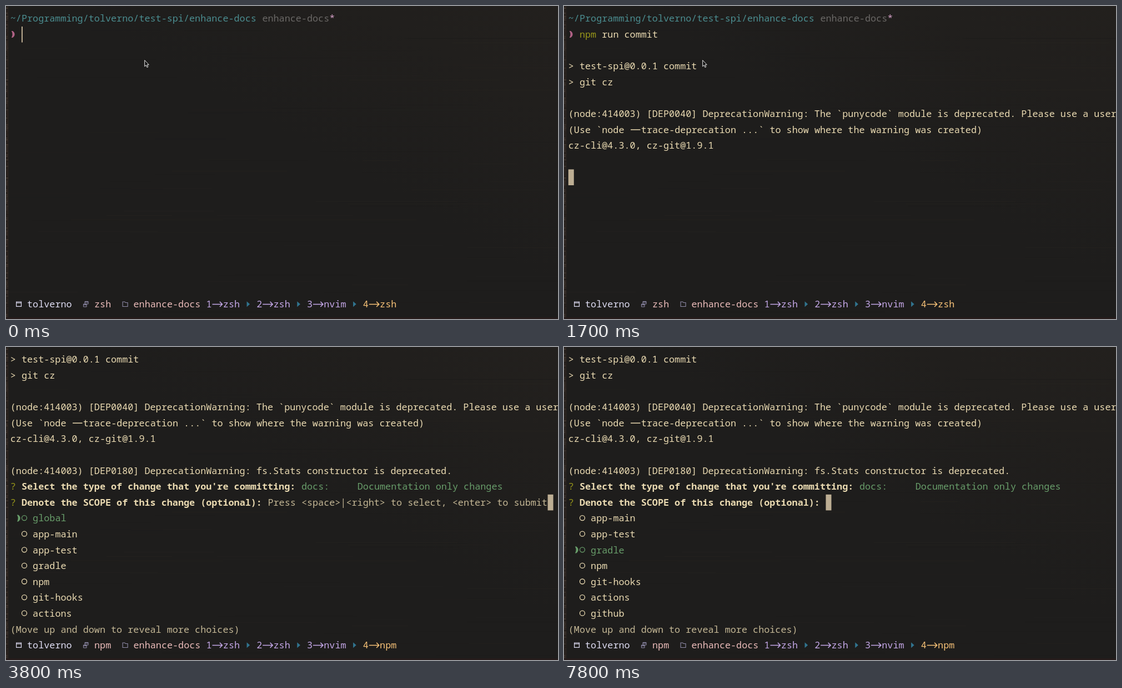
An HTML page that plays this animation: 994 px wide and 564 px high, repeating every 8 s.

```html
<!DOCTYPE html>
<html lang="en">
<head>
<meta charset="utf-8">
<title>Terminal commit prompt</title>
<style>
  html, body { margin: 0; width: 100%; height: 100%; overflow: hidden; background: #1e1d1c; }
  svg { display: block; width: 994px; height: 564px; }
  text { font: 16.8px "Noto Sans Mono", "DejaVu Sans Mono", monospace; white-space: pre; font-variant-ligatures: none; }
  .bold { font-weight: 700; }
</style>
</head>
<body>
<svg viewBox="0 0 994 564">
  <defs>
    <linearGradient id="glow" x1="0" y1="1" x2="1" y2="0">
      <stop offset=".55" stop-color="#2a2520" stop-opacity="0"/>
      <stop offset="1" stop-color="#2a2520" stop-opacity=".4"/>
    </linearGradient>
  </defs>
  <rect width="994" height="564" fill="#1e1d1c"/>
  <rect width="994" height="564" fill="url(#glow)"/>
  <g id="wood"></g>
  <g id="screen"></g>
  <path id="mouse" d="M249.7 97.7v11.2l2.5-2.3 1.8 4 1.8-.8-1.8-3.9h3.3z" fill="#111" stroke="#eee" stroke-width="1"/>
</svg>
<script>
const LOOP = 8000, CELL = 10.08, LINE = 28.6, LEFT = 7.8, TOP = 8.4;
const C = {
  fg: '#ebdbb2', dim: '#c4b795', ghost: '#8f8071', path: '#4b8d90', branch: '#6a6866', star: '#d9a3cb',
  prompt: '#b16286', olive: '#98971a', red: '#cc241d', green: '#689d6a', cursor: '#bdae93',
  session: '#e0def4', rose: '#ebbcba', icon: '#908caa', iris: '#c4a7e7', pine: '#31748f', gold: '#f6c177'
};
const colX = c => +(LEFT + c * CELL).toFixed(2);
const rowY = r => +(TOP + r * LINE).toFixed(2);
const escape = s => s.replace(/&/g, '&amp;').replace(/</g, '&lt;');

const put = (r, c, s, fill = C.fg, cls = '') =>
  `<text x="${colX(c)}" y="${rowY(r) + 20}" fill="${fill}" class="${cls}">${escape(s)}</text>`;
const shape = (r, c, d, style) =>
  `<path transform="translate(${colX(c)} ${rowY(r)})" d="${d}" ${style}/>`;
const line = (color, w = 1.4) => `fill="none" stroke="${color}" stroke-width="${w}"`;
const chevron = (r, c, color) =>
  shape(r, c, 'M2 8h2.2q3.6 2.4 3.6 6t-3.6 6H2q1.8-3 1.8-6T2 8z', `fill="${color}"`);
const block = (r, c, w = 10) =>
  `<rect x="${colX(c)}" y="${rowY(r)}" width="${w}" height="28.6" fill="${C.cursor}"/>`;

function radio(r, on, color) {
  const at = `cx="33" cy="${rowY(r) + 13.7}"`;
  const ring = `<circle ${at} r="4.5" ${line(on ? C.olive : color, 1.3)}/>`;
  return on ? ring + `<circle ${at} r="3" fill="${C.olive}"/>` : ring;
}

function status(app) {
  const r = 18;
  let s = shape(r, 1, 'M.8 9.8h8.8v8.4H.8zM.8 11.6h8.8', line(C.session, 1.2))
    + put(r, 3, 'tolverno', C.session)
    + shape(r, 13, 'M3.2 9.2h6v4.6h-6zM3.2 10.6h6M.6 13.8h5.6v5H.6zM.6 15.2h5.6', line(C.icon, 1))
    + put(r, 15, app, C.rose)
    + shape(r, 20, 'M.7 9.8h3.8l1.2 1.5h4v7H.7z', line(C.icon, 1.1))
    + put(r, 22, 'enhance-docs', C.rose);
  [[35, 'zsh'], [44, 'zsh'], [53, 'nvim'], [63, app]].forEach(([c, name], i) => {
    const color = i === 3 ? C.gold : C.iris;
    s += put(r, c, String(i + 1), color)
      + shape(r, c + 1, 'M.8 14.2h18M14.2 9.6l4.6 4.6-4.6 4.6', line(color, 1.5))
      + put(r, c + 3, name, color);
    if (i < 3) s += shape(r, c + name.length + 4, 'M2.4 9l5.6 5-5.6 5z', `fill="${C.pine}"`);
  });
  return s;
}

const COMMAND = 'npm run commit';

function promptLines(v) {
  const dir = '~/Programming/tolverno/test-spi/enhance-docs';
  const typed = COMMAND.slice(0, v.typed);
  return [
    r => put(r, 0, dir, C.path) + put(r, 45, 'enhance-docs', C.branch) + put(r, 57, '*', C.star),
    r => chevron(r, 0, C.prompt)
      + put(r, 2, typed.slice(0, 3), v.typed < 3 ? C.red : C.olive)
      + put(r, 6, typed.slice(4))
      + (v.typed ? put(r, 2 + v.typed, COMMAND.slice(v.typed), C.ghost) : '')
  ];
}

const plain = s => r => put(r, 0, s);
const scriptLines = [
  plain(''), plain('> test-spi@0.0.1 commit'), plain('> git cz'), plain('')
];
const warningLines = [
  plain('(node:414003) [DEP0040] DeprecationWarning: The `punycode` module is deprecated. Please use a user'),
  r => put(r, 0, '(Use `node') + shape(r, 11, 'M1.4 14.3h17.4', line(C.fg, 1.5))
    + put(r, 13, 'trace-deprecation ...` to show where the warning was created)'),
  plain('cz-cli@4.3.0, cz-git@1.9.1'), plain('')
];
const statsLine = plain('(node:414003) [DEP0180] DeprecationWarning: fs.Stats constructor is deprecated.');
const moreLine = r => put(r, 0, '(Move up and down to reveal more choices)', C.dim);

const TYPES = [
  ['feat:', 'A new feature'], ['fix:', 'A bug fix'], ['docs:', 'Documentation only changes'],
  ['style:', 'Changes that do not affect the meaning of the code'],
  ['refactor:', 'A code change that neither fixes a bug nor adds a feature'],
  ['perf:', 'A code change that improves performance'],
  ['test:', 'Adding missing tests or correcting existing tests']
];
const SCOPES = ['global', 'app-main', 'app-test', 'gradle', 'npm', 'git-hooks', 'actions', 'github'];

const question = (r, s) => put(r, 0, '?', C.olive) + put(r, 2, s, C.fg, 'bold');
const pair = (r, c, [key, about], color) => put(r, c, key, color) + put(r, c + 10, about, color);

function menuLines(v) {
  const ask = r => question(r, "Select the type of change that you're committing:");
  if (v.menu === 'type') return [
    r => ask(r) + put(r, 52, v.hint, C.dim),
    ...TYPES.map((t, i) => r => i === v.pick
      ? chevron(r, 0, C.green) + pair(r, 2, t, C.green)
      : pair(r, 2, t, C.fg)),
    moreLine
  ];
  return [
    r => ask(r) + pair(r, 52, TYPES[2], C.green),
    r => question(r, 'Denote the SCOPE of this change (optional):') + put(r, 46, v.hint, C.dim),
    ...SCOPES.slice(v.first, v.first + 7).map((name, k) => r => {
      const i = v.first + k, color = i === v.pick ? C.green : C.fg;
      return (i === v.pick ? chevron(r, 1, color) : '') + radio(r, v.checked.includes(i), color)
        + put(r, 4, name, color);
    }),
    moreLine
  ];
}

// Each step changes only the values it names; cursor is [row, column, width].
const STEPS = [
  [0, { typed: 0, cursor: [1, 2, 2], stage: 0, scroll: 0, app: 'zsh', mouse: true, hint: '', checked: [], first: 0 }],
  [400, { typed: 1, cursor: [1, 3, 2] }],
  [600, { typed: 2, cursor: [1, 4, 2] }],
  [700, { typed: 3, cursor: [1, 5, 2] }],
  [800, { typed: 4, cursor: [1, 6, 2] }],
  [900, { typed: 5, cursor: [1, 7, 2] }],
  [1000, { typed: 6, cursor: [1, 8, 2] }],
  [1200, { typed: 14, cursor: [1, 16, 2] }],
  [1400, { cursor: [2, 0] }],
  [1500, { stage: 1, cursor: [6, 0] }],
  [1700, { stage: 2, cursor: [10, 0] }],
  [1800, { stage: 3, scroll: 2, menu: 'type', pick: 0, hint: 'Use arrow keys or type to search', cursor: [9, 84] }],
  [2300, { app: 'npm' }],
  [3000, { pick: 2, hint: '', cursor: [9, 52], mouse: false }],
  [3800, { scroll: 3, menu: 'scope', pick: 0, hint: 'Press <space>|<right> to select, <enter> to submit', cursor: [9, 96] }],
  [5100, { hint: '', checked: [0], cursor: [9, 46] }],
  [6300, { pick: 1 }],
  [6500, { checked: [0, 1] }],
  [7500, { checked: [0] }],
  [7700, { pick: 2 }],
  [7800, { pick: 3, first: 1 }]
];

const screen = document.getElementById('screen');
const mouse = document.getElementById('mouse');

function draw(v) {
  const lines = promptLines(v);
  if (v.stage > 0) lines.push(...scriptLines);
  if (v.stage > 1) lines.push(...warningLines);
  if (v.stage > 2) lines.push(statsLine, ...menuLines(v));
  screen.innerHTML = lines.map((fn, i) => i < v.scroll ? '' : fn(i - v.scroll)).join('')
    + block(...v.cursor) + status(v.app);
  mouse.style.display = v.mouse ? '' : 'none';
}

// Faint wood grain, with the brighter edge left of and below the window.
function drawWood() {
  let seed = 7, s = '';
  const rnd = () => (seed = seed * 16807 % 2147483647) / 2147483647;
  const bar = (x, y, w, h, fill, a) =>
    `<rect x="${x}" y="${y}" width="${w}" height="${h}" fill="${fill}" opacity="${a.toFixed(3)}"/>`;
  for (let i = 0; i < 90; i++)
    s += bar(rnd() * 900 | 0, rnd() * 560 | 0, 60 + rnd() * 240 | 0, 1, rnd() < .5 ? '#3a3028' : '#141414', .06 + rnd() * .12);
  s += bar(0, 0, 4.5, 564, '#2b2420', 1) + bar(0, 561, 994, 3, '#261c1b', 1);
  for (let y = 0; y < 561; y += 3)
    s += bar(0, y, 2 + rnd() * 2.5 | 0, 2, rnd() < .5 ? '#4c4037' : '#191513', .2 + rnd() * .4);
  document.getElementById('wood').innerHTML = s;
}

let shown = -1;
function tick() {
  const t = performance.now() % LOOP;
  const count = STEPS.filter(([at]) => at <= t).length;
  if (count !== shown) {
    shown = count;
    draw(Object.assign({}, ...STEPS.slice(0, count).map(([, change]) => change)));
  }
  requestAnimationFrame(tick);
}

drawWood();
tick();
</script>
</body>
</html>
```
